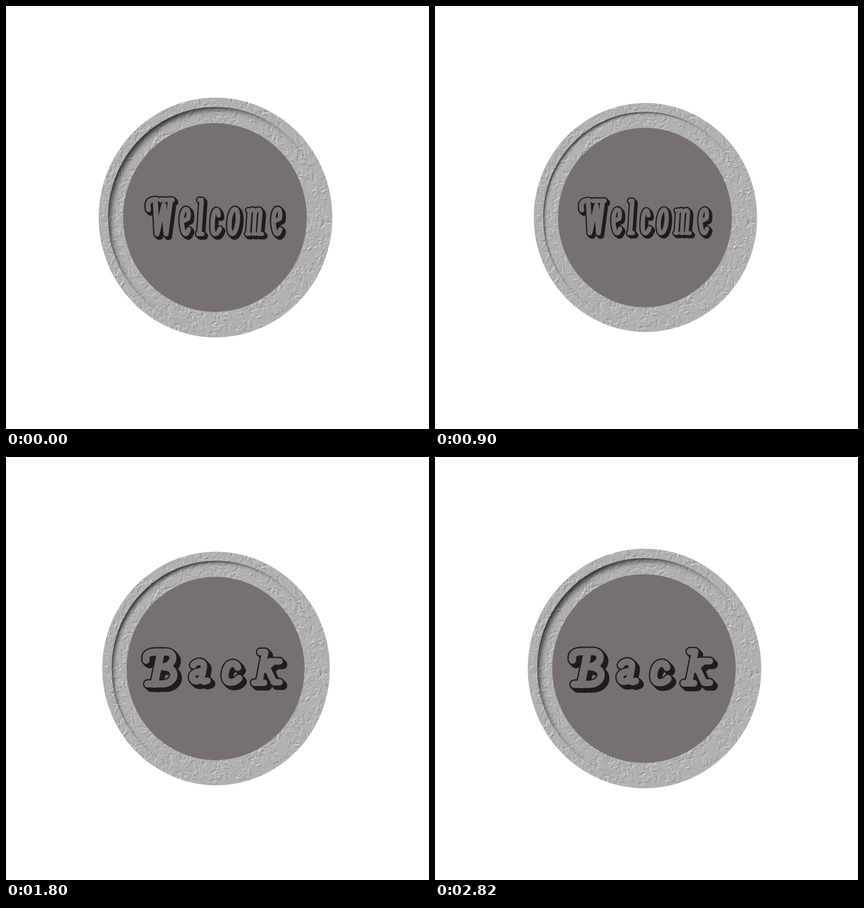
Animation, 748 px wide and 748 px high, one loop 2.88 s. Source, as an HTML page with a canvas:

```html
<!DOCTYPE html>
<html lang="en">
<head>
<meta charset="utf-8">
<title>Welcome Back</title>
<style>
html, body { margin: 0; width: 100%; height: 100%; overflow: hidden; background: #fff; }
canvas { display: block; }
</style>
</head>
<body>
<canvas id="stage" width="748" height="748" role="img" aria-label="Welcome Back"></canvas>
<script>
const ctx = document.getElementById('stage').getContext('2d');
const LOOP = 2880, STEP = 60, PULSE = 1440;
const GREY = '#777070', INK = '#1d1d1b';

// Lettering as pen strokes: [pen width, path]
const e = x => [8, `M${x} 380l8-4c2-12 0-17-4-17c-6 1-9 17-6 32c2 15 8 16 11 4`];
const word = (depth, strokes) => ({ depth, strokes: strokes.map(([w, d]) => [w, new Path2D(d)]) });
const welcome = word(4, [
  [9, 'M252 360C249 346 254 342 266 342M264 343L267 403L279 352L283 403L291 343M274 343H281M287 343H294'],
  e(314),
  [8, 'M342 343H346L342 403M340 403H347'],
  [8, 'M376 370C375 356 368 358 366 375C364 397 366 404 371 403C374 403 376 399 378 394'],
  [8, 'M405 359C395 359 391 403 400 403C410 403 414 359 405 359Z'],
  [7, 'M428 361H431L428 403M430 368C433 357 441 357 440 368L438 403M440 368C443 357 451 357 450 368L447 403M426 403H430M437 403H440M446 403H453'],
  e(476)
]);
const back = word(6, [
  [14, 'M270 345L258 402'],
  [13, 'M243 359C241 346 250 344 262 344H280C298 345 295 368 274 371C302 371 299 402 272 402H246'],
  [12, 'M329 368C334 360 350 359 348 372L344 392C345 399 350 399 355 396M346 379C334 379 326 383 327 391C329 400 340 399 344 391'],
  [13, 'M410 372C407 362 394 362 389 375C384 390 388 400 398 399C405 399 409 396 412 392'],
  [12, 'M451 344H460L449 399M440 400H458M456 377L474 362M468 361H486M464 374L476 399H486']
]);

// Embossed plaster: fans of needles form a height map, lit from the upper left
function makePlaster(size) {
  const canvas = document.createElement('canvas');
  canvas.width = canvas.height = size;
  const g = canvas.getContext('2d');
  let seed = 20117;
  const rnd = () => (seed = seed * 16807 % 2147483647) / 2147483647;
  g.fillStyle = '#808080';
  g.fillRect(0, 0, size, size);
  g.lineCap = 'round';
  for (let i = 0; i < 3000; i++) {
    const x = rnd() * size, y = rnd() * size, turn = rnd() * 7;
    for (let n = 1 + rnd() * 4; n > 0; n--) {
      const a = turn + rnd() * 1.3, len = 3 + rnd() * 10, tone = rnd() < .5 ? 255 : 0;
      g.lineWidth = 1 + rnd() * 2;
      g.strokeStyle = `rgba(${tone},${tone},${tone},${.06 + rnd() * .2})`;
      g.beginPath();
      g.moveTo(x, y);
      g.lineTo(x + len * Math.cos(a), y + len * Math.sin(a));
      g.stroke();
    }
  }
  const high = g.getImageData(0, 0, size, size).data;
  const lit = g.createImageData(size, size);
  const at = (x, y) => high[4 * (Math.min(size - 1, Math.max(0, y)) * size + Math.min(size - 1, Math.max(0, x)))];
  for (let y = 0; y < size; y++) for (let x = 0; x < size; x++) {
    const slope = at(x + 1, y + 1) - at(x - 1, y - 1);
    const v = 177 + Math.max(-75, Math.min(50, slope * .5));
    lit.data.set([v, v, v, 255], 4 * (y * size + x));
  }
  g.putImageData(lit, 0, 0);
  return canvas;
}
const plaster = makePlaster(440);

function oval(x, y, rx, ry) {
  const p = new Path2D();
  p.ellipse(x, y, rx, ry, 0, 0, 2 * Math.PI);
  return p;
}

function drawRing(p) {
  const x = 372.4 - 1.9 * p, rx = 195.9 + 10.7 * p, ry = 200.8 + 11.2 * p;
  ctx.save();
  ctx.clip(oval(x, 374, rx, ry));
  const w = rx * 2.1, h = ry * 2.1;
  ctx.drawImage(plaster, x - w / 2, 374 - h / 2, w, h);

  // Inner shadow from the upper left; its caster stays off the stage
  const far = 2000, grow = 2 + 3 * p, shift = 3 + 5 * p;
  const ix = rx - 16.5, iy = ry - 15.5 - p;
  ctx.clip(oval(x, 374, ix, iy));
  const caster = new Path2D();
  caster.rect(-300 - far, -300, 1348, 1348);
  caster.addPath(oval(x - far, 374, ix + grow, iy + grow));
  ctx.shadowColor = 'rgba(0,0,0,.8)';
  ctx.shadowOffsetX = far + shift;
  ctx.shadowOffsetY = shift;
  ctx.shadowBlur = 4 + 7 * p;
  ctx.fillStyle = '#000';
  ctx.fill(caster, 'evenodd');
  ctx.restore();
}

function drawWord({ depth, strokes }, p) {
  const s = .942 + .058 * p;
  const pen = (color, extra, d) => {
    ctx.save();
    ctx.translate(d, d);
    ctx.strokeStyle = color;
    for (const [w, path] of strokes) {
      ctx.lineWidth = w + extra;
      ctx.stroke(path);
    }
    ctx.restore();
  };
  ctx.save();
  ctx.translate(405, 374);
  ctx.scale(s, s);
  ctx.translate(-405, -374);
  ctx.lineCap = ctx.lineJoin = 'round';
  for (let d = depth; d >= 0; d--) pen(INK, 4.5, d);
  pen(GREY, 0, 0);
  ctx.restore();
}

function draw(now) {
  const t = Math.floor(now % LOOP / STEP) * STEP;
  const p = (1 + Math.cos(t / PULSE * 2 * Math.PI)) / 2;
  ctx.fillStyle = '#fff';
  ctx.fillRect(0, 0, 748, 748);
  drawRing(p);
  ctx.fillStyle = GREY;
  ctx.fill(oval(371.6 - 2.1 * p, 374, 152.3 + 10.2 * p, 157.3 + 9.7 * p));
  drawWord(t < PULSE ? welcome : back, p);
}

const start = performance.now();
function loop() {
  draw(performance.now() - start);
  requestAnimationFrame(loop);
}
loop();
</script>
</body>
</html>
```
